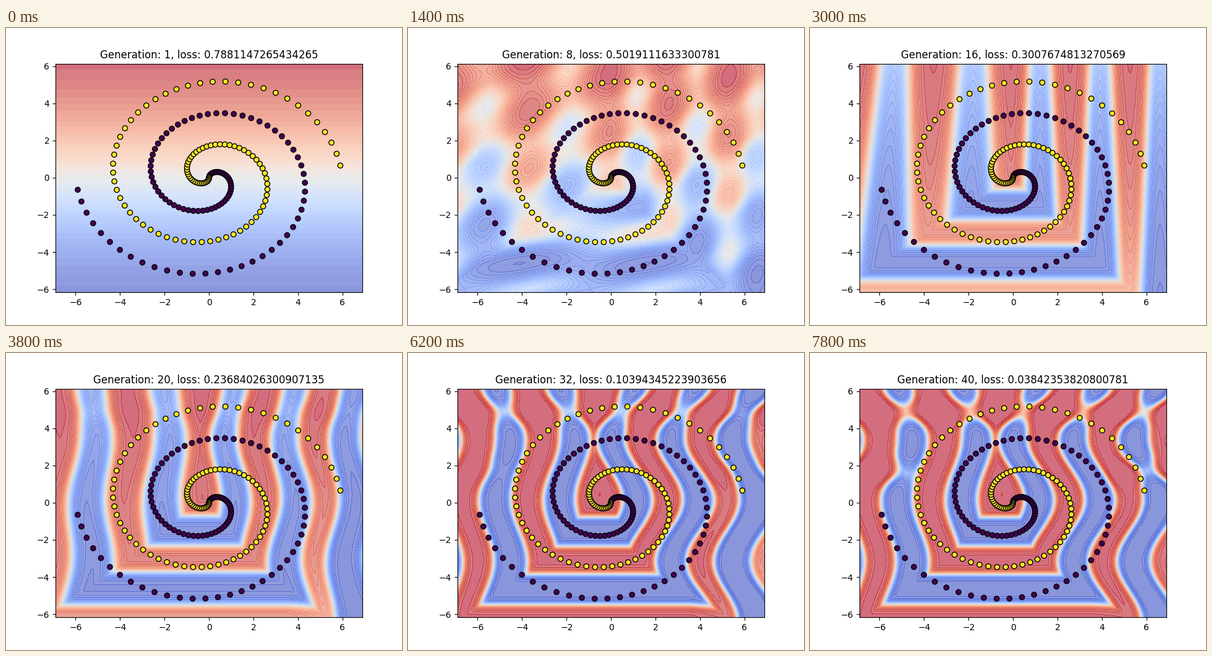
A matplotlib script that plays this animation: 640x480 px, repeating every 8 s.

```python
import numpy as np
import matplotlib.pyplot as plt
from matplotlib.animation import FuncAnimation

FRAMES, STEP_MS = 40, 200

# Loss at a few generations, linear in between
LOSS = {1: 0.7881147265434265, 5: 0.5722935199737549,
        12: 0.4080680310726166, 16: 0.3007674813270569,
        25: 0.15693125128746033, 32: 0.10394345223903656,
        40: 0.03842353820800781}

# Two interleaved spirals, one per class
t = np.arange(100) / 100
arm = np.column_stack([6 * t * np.sin(3.5 * np.pi * t),
                       6 * t * np.cos(3.5 * np.pi * t)])
points = np.vstack([arm, -arm])
labels = np.repeat([0, 1], 100)

x_axis, y_axis = (np.arange(points[:, k].min() - 1, points[:, k].max() + 1, 0.1)
                  for k in (0, 1))
X, Y = np.meshgrid(x_axis, y_axis)


def ramp(gen, start, end):
    return np.clip((gen - start) / (end - start), 0, 1)


def wave(v, period):
    return np.cos(2 * np.pi * v / period)


def bump(v, centre, width):
    return np.exp(-((v - centre) / width) ** 2)


def sigmoid(v):
    return 1 / (1 + np.exp(-v))


def ring_phase(gen):
    """Number of bands crossed between the centre and each grid point."""
    bend = ramp(gen, 16, 25)
    slant = 0.03 * ramp(gen, 12, 16) * (1 - bend)
    zigzag = wave(Y - 3.45, 6.6)
    right = X / 2.7 + 0.05 + bend * (0.23 + 0.22 * zigzag)
    left = -X / (3.75 - 0.85 * bend - slant * Y) - bend * (0.18 - 0.12 * zigzag)
    below = -Y / 3.1 + 0.04 * (1 - bend)
    return np.maximum(np.maximum(left, right), below)


def field(gen):
    """Class probability on the grid."""
    tilt = 0.42 * np.exp(-(gen - 1) / 25)
    slanted = 0.8 * (ramp(gen, 1, 5) - ramp(gen, 5, 12))
    rings = 2 * ramp(gen, 5, 12) + 3 * ramp(gen, 12, 32)
    fade = 0.8 * ramp(gen, 16, 25) - 0.4 * ramp(gen, 32, 40)
    top_bridge = 5.5 * ramp(gen, 18, 40)
    side_bridge = 4.5 * ramp(gen, 28, 40)

    logit = tilt * Y
    logit += slanted * wave(X - 1.82 * Y - 1.42, 5.7)
    logit += rings * wave(ring_phase(gen), 1)
    logit -= fade * np.maximum(X - 3.5, 0)
    logit += top_bridge * bump(Y, 4.9, 0.7)
    logit += side_bridge * bump(Y, 1.7, 0.7) * sigmoid(4 * (np.abs(X) - 4.6))
    return sigmoid(logit)


fig, ax = plt.subplots(figsize=(6.4, 4.8), dpi=100)


def draw(frame):
    gen = frame + 1
    loss = np.interp(gen, list(LOSS), list(LOSS.values()))
    ax.clear()
    ax.contourf(X, Y, field(gen), 50, cmap='coolwarm', alpha=0.6)
    ax.scatter(points[:, 0], points[:, 1], c=labels, edgecolors='k')
    ax.set_xlim(x_axis[0], x_axis[-1])
    ax.set_ylim(y_axis[0], y_axis[-1])
    ax.set_title(f"Generation: {gen}, loss: {float(np.float32(loss))}")
    return []


anim = FuncAnimation(fig, draw, frames=FRAMES, init_func=lambda: [],
                     interval=STEP_MS, repeat=True, repeat_delay=0)
plt.show()
```
